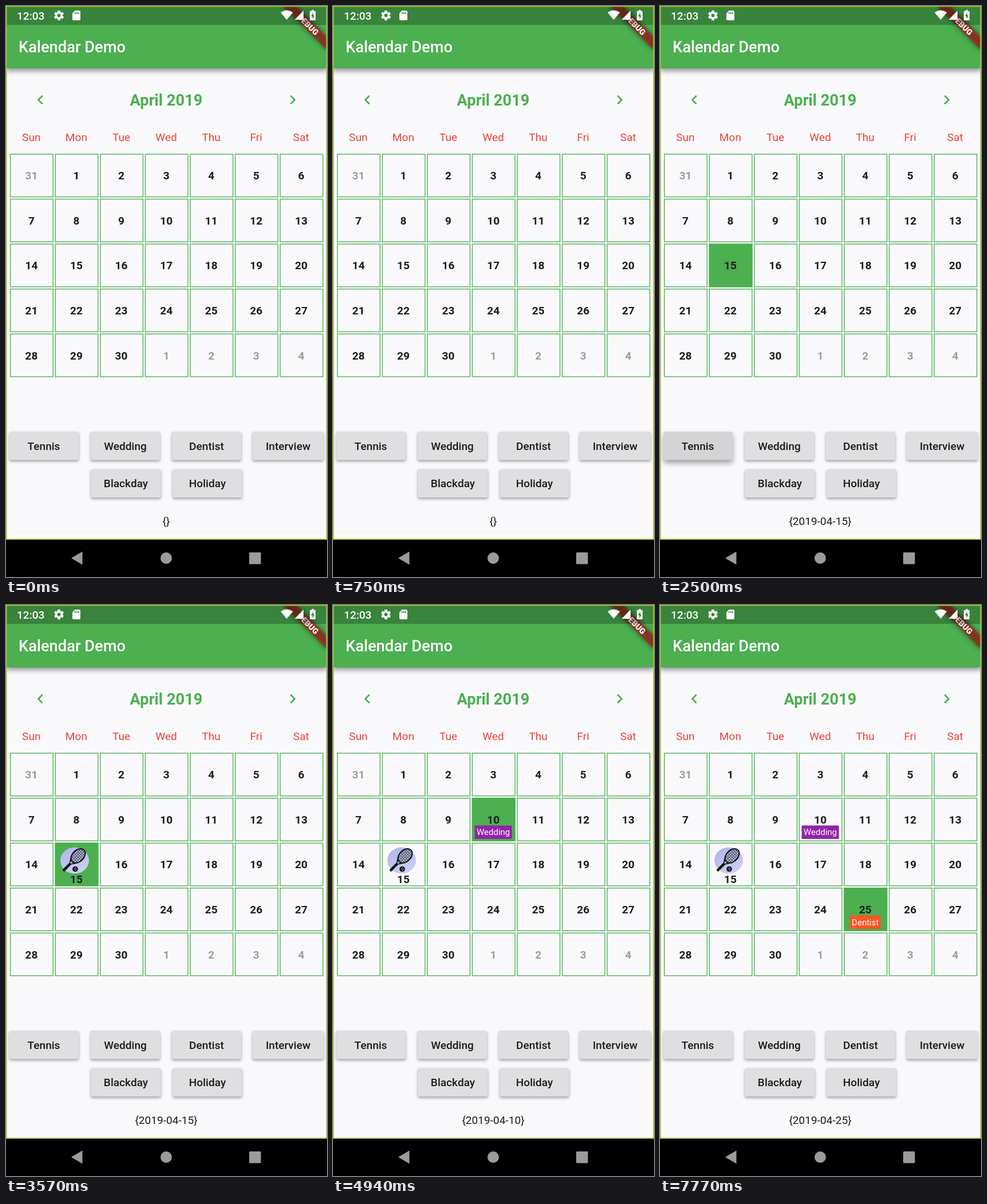
Animation, 561 px wide and 998 px high, one loop 8 s. Source, as an HTML page with a canvas:

```html
<!DOCTYPE html>
<html lang="en">
<head>
<meta charset="utf-8">
<title>Calendar demo</title>
<style>
html, body { margin: 0; width: 100%; height: 100%; overflow: hidden; background: #000; }
canvas { display: block; }
</style>
</head>
<body>
<canvas id="stage" width="561" height="998"></canvas>
<script>
const ctx = document.getElementById('stage').getContext('2d');
const LOOP = 8000;
const DP = 561 / 411.43;
const GREEN = '#4caf50', INK = '#1b1b1b', PAPER = '#f9f9fc';

const cell = { x: 7, y: 258.3, pitch: 78.58, size: 76 };
const selections = [
  { at: 2170, day: 15 },
  { at: 4530, day: 10 },
  { at: 6560, day: 25 }
];
const presses = [
  { name: 'Tennis', at: 2500, end: 2580, release: 3200, day: 15 },
  { name: 'Wedding', at: 4860, end: 4940, release: 4940, day: 10, color: '#9323a9' },
  { name: 'Dentist', at: 6890, end: 6980, release: 7770, day: 25, color: '#fb5524' }
];
const PHOTO_AT = 3570;

const buttons = [
  { name: 'Tennis', x: 6, y: 744, w: 121 },
  { name: 'Wedding', x: 148, y: 744, w: 121 },
  { name: 'Dentist', x: 290, y: 744, w: 121 },
  { name: 'Interview', x: 431, y: 744, w: 124 },
  { name: 'Blackday', x: 148.5, y: 809.5, w: 122 },
  { name: 'Holiday', x: 291.5, y: 809.5, w: 121 }
];

function text(str, x, y, { size = 14, weight = 400, color = INK, align = 'center' } = {}) {
  ctx.font = `${weight} ${size * DP}px Roboto, sans-serif`;
  ctx.fillStyle = color;
  ctx.textAlign = align;
  ctx.fillText(str, x, y);
}

function rect(x, y, w, h, color) {
  ctx.fillStyle = color;
  ctx.fillRect(x, y, w, h);
}

function roundRect(x, y, w, h, r, color) {
  ctx.fillStyle = color;
  ctx.beginPath();
  ctx.roundRect(x, y, w, h, r);
  ctx.fill();
}

function disc(x, y, r, color) {
  ctx.fillStyle = color;
  ctx.beginPath();
  ctx.arc(x, y, r, 0, Math.PI * 2);
  ctx.fill();
}

function shape(path, color, x = 0, y = 0, scale = 1) {
  ctx.save();
  ctx.translate(x, y);
  ctx.scale(scale, scale);
  ctx.fillStyle = color;
  ctx.fill(new Path2D(path));
  ctx.restore();
}

function withShadow(alpha, offset, blur, draw) {
  ctx.save();
  ctx.shadowColor = `rgba(0,0,0,${alpha})`;
  ctx.shadowOffsetY = offset;
  ctx.shadowBlur = blur;
  draw();
  ctx.restore();
}

function drawAppBar() {
  withShadow(0.45, 4, 9, () => rect(0, 0, 561, 109, GREEN));
  text('Kalendar Demo', 22, 81, { size: 20, weight: 500, color: '#fff', align: 'left' });
}

function drawBanner() {
  ctx.save();
  ctx.translate(561, 0);
  ctx.rotate(Math.PI / 4);
  const box = [-40 * DP, 28 * DP, 80 * DP, 12 * DP];
  ctx.filter = 'blur(5px)';
  rect(...box, 'rgba(0,0,0,.5)');
  ctx.filter = 'none';
  rect(...box, 'rgba(183,28,28,.627)');
  text('DEBUG', 0, 34 * DP + 5, { size: 10.2, weight: 900, color: '#fff' });
  ctx.restore();
}

function drawStatusBar() {
  const dark = '#39843c';
  rect(0, 0, 561, 33, 'rgba(0,0,0,.25)');
  text('12:03', 19, 24, { weight: 500, color: '#fff', align: 'left' });

  disc(92.5, 16.5, 6.5, '#fff');
  for (let i = 0; i < 6; i++) {
    ctx.save();
    ctx.translate(92.5, 16.5);
    ctx.rotate(i * Math.PI / 3);
    rect(-2.3, -8.6, 4.6, 4, '#fff');
    ctx.restore();
  }
  disc(92.5, 16.5, 2.9, dark);

  shape('M120.5 8H128q2 0 2 2V23q0 2-2 2H118q-2 0-2-2V13Z', '#fff');
  for (const x of [120, 123, 126]) rect(x, 10.5, 1.6, 3.6, dark);

  shape('M490.5 24 480 11.2Q490.5 4 501.5 11.2Z', '#fff');
  shape('M520 8V24H504.5Z', '#fff');
  shape('M534 7h4v2h3v16h-10V9h3Z', '#fff');
  shape('M537 11.5 533 18h2.6v5l3.7-6.5h-2.3Z', dark);
}

function drawHeading() {
  const scale = DP, top = 164 - 12 * scale;
  shape('M15.41 7.41 14 6l-6 6 6 6 1.41-1.41L10.83 12z', GREEN, 60 - 12 * scale, top, scale);
  shape('M10 6 8.59 7.41 13.17 12l-4.58 4.59L10 18l6-6z', GREEN, 501 - 12 * scale, top, scale);
  text('April 2019', 280, 174, { size: 20, weight: 700, color: GREEN });
  'Sun Mon Tue Wed Thu Fri Sat'.split(' ').forEach((name, i) =>
    text(name, 44.3 + i * cell.pitch, 236, { color: '#eb4238' }));
}

function drawRacket() {
  const fill = ctx.createLinearGradient(108, 424, 130, 470);
  fill.addColorStop(0, '#b2b7e8');
  fill.addColorStop(1, '#cdcff5');
  ctx.save();
  ctx.fillStyle = fill;
  ctx.beginPath();
  ctx.ellipse(120, 446.5, 25, 23, 0, 0, Math.PI * 2);
  ctx.fill();

  ctx.save();
  ctx.translate(126, 438.5);
  ctx.rotate(-Math.PI / 4);
  ctx.strokeStyle = '#111';
  ctx.lineWidth = 2;
  ctx.beginPath();
  ctx.ellipse(0, 0, 14.5, 10, 0, 0, Math.PI * 2);
  ctx.stroke();

  ctx.save();
  ctx.clip();
  ctx.lineWidth = 0.8;
  ctx.beginPath();
  for (let i = -12; i <= 12; i += 3.4) {
    ctx.moveTo(i, -11); ctx.lineTo(i, 11);
    ctx.moveTo(-15, i); ctx.lineTo(15, i);
  }
  ctx.stroke();
  ctx.restore();

  ctx.lineWidth = 1.8;
  ctx.beginPath();
  ctx.moveTo(-12, -6); ctx.lineTo(-21, 0); ctx.lineTo(-12, 6);
  ctx.stroke();
  roundRect(-37, -2.3, 18, 4.6, 1.5, '#111');
  ctx.restore();

  disc(121, 461.5, 4.8, '#111');
  ctx.strokeStyle = '#d6d8f5';
  ctx.lineWidth = 0.8;
  ctx.beginPath();
  ctx.arc(118, 457.5, 4.2, 0.1, 1.5);
  ctx.moveTo(121, 465);
  ctx.arc(124.5, 465, 3.5, Math.PI, 4.6);
  ctx.stroke();
  ctx.restore();
}

function drawLabel(name, x, y, color) {
  const width = name === 'Wedding' ? 65 : 54;
  rect(x - width / 2, y, width, 23.5, color);
  text(name, x, y + 17, { size: 11, color: '#fff' });
}

function drawCalendar(t, selected) {
  for (let i = 0; i < 35; i++) {
    const x = cell.x + (i % 7) * cell.pitch;
    const y = cell.y + Math.floor(i / 7) * cell.pitch;
    const cx = x + 37.4;
    const inMonth = i >= 1 && i <= 30;
    const day = i === 0 ? 31 : inMonth ? i : i - 30;
    const event = inMonth && presses.find(p => p.day === day && t >= (p.at + p.end) / 2);

    if (inMonth && day === selected) rect(x, y, cell.size, cell.size, GREEN);
    ctx.strokeStyle = GREEN;
    ctx.lineWidth = DP;
    ctx.strokeRect(x + DP / 2, y + DP / 2, cell.size - DP, cell.size - DP);

    const drop = event && !event.color ? 25.3 : 0;
    if (drop && t >= PHOTO_AT) drawRacket();
    text(day, cx, y + 45 + drop, { weight: 700, color: inMonth ? INK : '#9c9c9c' });
    if (event && event.color) drawLabel(event.name, cx, y + 48.5, event.color);
  }
}

function drawButton({ name, x, y, w }, t) {
  const press = presses.find(p => p.name === name && t >= p.at && t < p.release);
  const lift = press && t < press.end
    ? Math.sin(Math.PI * (t - press.at + 20) / (press.end - press.at + 40)) : 0;
  const fill = press ? '#d4d4d6' : '#dfdfe1';
  withShadow(0.36, 2.6 + lift * 5, 5 + lift * 9, () => roundRect(x, y, w, 49.5, 2.7, fill));
  text(name, x + w / 2 - (name === 'Tennis' ? 0.5 : 0), y + 31.8, { weight: 500 });
}

function drawNavigation() {
  rect(0, 932.5, 561, 65.5, '#000');
  shape('M114 965 133.5 953.5V976.5Z', '#9b9b9b');
  disc(280, 965, 10, '#9b9b9b');
  roundRect(425, 955, 20.5, 20.5, 1.5, '#9b9b9b');
}

function draw(t) {
  const selected = selections.filter(s => t >= s.at).map(s => s.day).pop();
  rect(0, 0, 561, 998, PAPER);
  drawAppBar();
  drawHeading();
  drawCalendar(t, selected);
  buttons.forEach(b => drawButton(b, t));
  text(selected ? `{2019-04-${selected}}` : '{}', 280, 906.5);
  drawBanner();
  drawStatusBar();
  drawNavigation();
  ctx.strokeStyle = '#a6c626';
  ctx.lineWidth = 1.5;
  ctx.strokeRect(0.75, 0.75, 559.5, 931.2);
}

const start = performance.now();
function tick() {
  draw((performance.now() - start) % LOOP);
  requestAnimationFrame(tick);
}
tick();
</script>
</body>
</html>
```
